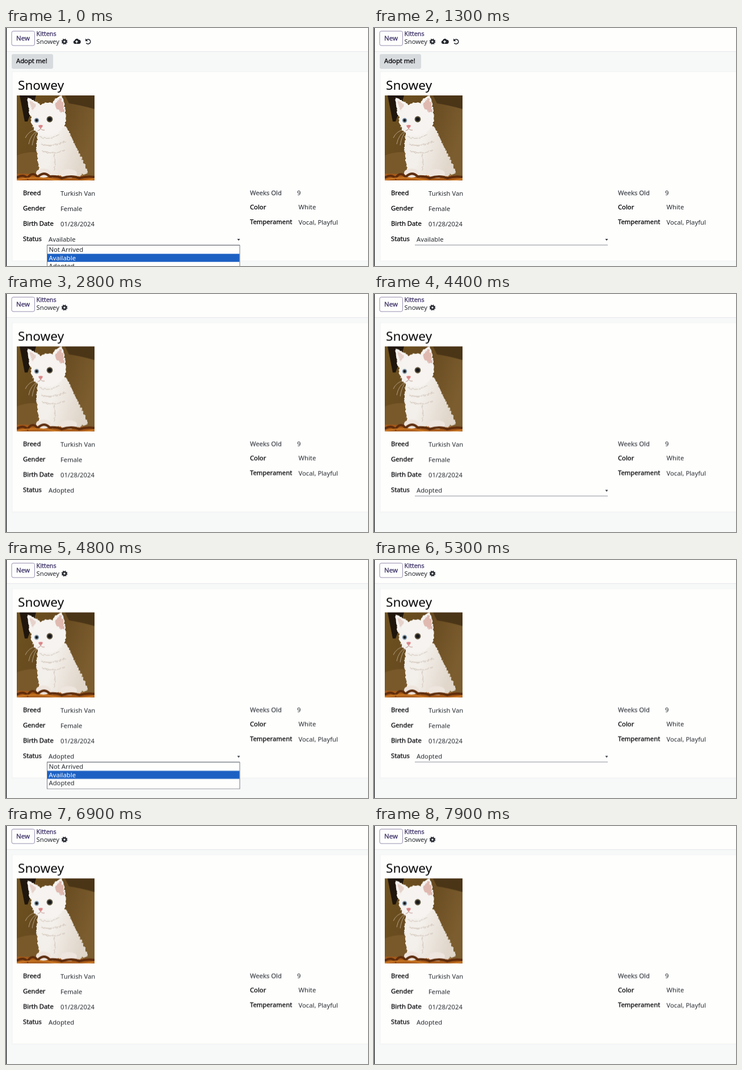
Animation, 638 px wide and 420 px high, one loop 8500 ms. Source, as an HTML page:

```html
<!DOCTYPE html>
<html lang="en">
<head>
<meta charset="utf-8">
<title>Kitten form</title>
<style>
html, body { margin: 0; width: 100%; height: 100%; overflow: hidden; background: #f7f8f8; }
svg { display: block; width: 638px; height: 420px; }
text { font: 11.25px "Noto Sans", "Open Sans", sans-serif; fill: #24282d; white-space: pre; }
.label text, .strong { font-weight: 500; fill: #08090b; stroke: #08090b; stroke-width: .3px; }
.label .muted { fill: #4b4f55; stroke: #4b4f55; }
.title { font-size: 22.6px; fill: #050505; }
.link { font-size: 10.8px; fill: #3d3267; stroke: #3d3267; }
.white { fill: #fff; }

/* Hard state changes on one shared clock */
.sheet, .draft, .saved, .focus, .popup, .pick-a, .pick-b, .button {
  animation: 8500ms step-end infinite;
}
.sheet { animation-name: sheet; }
.draft { animation-name: draft; }
.saved { animation-name: saved; }
.focus { animation-name: focus; }
.popup { animation-name: popup; }
.pick-a { animation-name: pick-a; }
.pick-b { animation-name: pick-b; }
.button { animation-name: button; }

@keyframes sheet {
  0%, 63.529% { transform: none; }
  28.235%, 78.823%, 100% { transform: translateY(-26.5px); }
}
@keyframes draft {
  0%, 63.529% { opacity: 1; }
  28.235%, 78.823%, 100% { opacity: 0; }
}
@keyframes saved {
  0%, 63.529% { opacity: 0; }
  28.235%, 78.823%, 100% { opacity: 1; }
}
@keyframes focus {
  0%, 37.647% { opacity: 1; }
  28.235%, 78.823%, 100% { opacity: 0; }
}
@keyframes popup {
  0%, 52.941% { opacity: 1; }
  8.235%, 61.176%, 100% { opacity: 0; }
}
@keyframes pick-a {
  0%, 56.47%, 100% { opacity: 1; }
  52.941% { opacity: 0; }
}
@keyframes pick-b {
  0%, 56.47%, 100% { opacity: 0; }
  52.941% { opacity: 1; }
}
@keyframes button {
  0% { fill: #d8dbde; }
  63.529%, 100% { fill: #cfd4d9; }
}
</style>
</head>
<body>
<svg viewBox="0 0 638 420">
  <defs>
    <linearGradient id="wall" x2="1" y2=".4">
      <stop offset="0" stop-color="#70531f"/>
      <stop offset=".5" stop-color="#66491f"/>
      <stop offset="1" stop-color="#7b5d2f"/>
    </linearGradient>
    <linearGradient id="fur" x2="1" y2=".3">
      <stop offset=".4" stop-color="#f3efea"/>
      <stop offset="1" stop-color="#e0d6ca"/>
    </linearGradient>
    <filter id="fluff" x="-10%" y="-10%" width="120%" height="120%">
      <feTurbulence type="fractalNoise" baseFrequency=".25" numOctaves="2" seed="4"/>
      <feDisplacementMap in="SourceGraphic" scale="5" xChannelSelector="R" yChannelSelector="G"/>
    </filter>
    <clipPath id="frame"><rect x="19" y="119" width="137" height="150"/></clipPath>
  </defs>

  <rect width="638" height="420" fill="#f7f8f8"/>
  <rect width="638" height="41" fill="#fefefd"/>
  <path d="M0 41.5H638" stroke="#e6e8ea"/>

  <!-- Header -->
  <rect x="10" y="5.5" width="40.5" height="25.5" rx="3" fill="#fefefd" stroke="#978eb0"/>
  <text class="strong link" x="18" y="22" style="font-size:11.5px">New</text>
  <text class="strong link" x="53.5" y="14">Kittens</text>
  <text x="53.5" y="28">Snowey</text>
  <g fill="none" stroke="#23272d">
    <circle cx="103" cy="24" r="2.9" stroke-width="2.4"/>
    <circle cx="103" cy="24" r="4.5" stroke-width="1.7" stroke-dasharray="1.77 1.77"/>
  </g>

  <g class="draft">
    <path d="M121.5 28a3 3 0 0 1-.5-5.9 3.8 3.8 0 0 1 7.1-1.3 3.6 3.6 0 0 1 .2 7.2Z" fill="#23272d"/>
    <path d="M124.5 27v-4.5m-2 2 2-2 2 2" fill="none" stroke="#fff" stroke-width="1.2"/>
    <path d="M141.5 21.5a4.1 4.1 0 1 1-.2 4.8" fill="none" stroke="#23272d" stroke-width="1.5"/>
    <path d="M140 18.6v4.6h4.6Z" fill="#23272d"/>
    <rect class="button" x="10" y="46" width="73" height="26" rx="3"/>
    <text class="strong" x="18" y="62.2">Adopt me!</text>
  </g>

  <!-- Form sheet -->
  <g class="sheet">
    <rect x="11" y="77" width="640" height="334" fill="#fefefd" stroke="#f0f1f2"/>
    <text class="title" x="21" y="109">Snowey</text>

    <g clip-path="url(#frame)">
      <rect x="19" y="119" width="137" height="150" fill="url(#wall)"/>
      <path d="M24 119h29l-9 30-6 16h-5Z" fill="#20160c"/>
      <path d="M104 119h52v24q-25-7-45-10Z" fill="#4b3517"/>
      <path d="M19 225q35-14 70 5v40H19Z" fill="#79592a"/>
      <path d="M19 257l137 4v10H19Z" fill="#a85a18"/>
      <g filter="url(#fluff)">
        <path d="M57 183C51 207 55 231 60 256l20 7 22-4 25 3 17-6C138 234 128 221 119 200L106 173Z" fill="url(#fur)"/>
        <path d="M38 123Q50 127 61 135 72 130 82 132 88 121 98 119 105 135 105 152 110 172 90 186 71 195 57 187 44 176 44 158 38 140 38 123Z" fill="#f6f3f0"/>
        <g fill="none" stroke="#d6ccc2" stroke-width="1.4">
          <path d="M59 191q15 9 34-3M61 204q16 8 44-4M62 217q24 8 42-2M85 222q3 16 0 30"/>
        </g>
        <path d="M86 137q4-10 11-14 6 13 5 25-8 3-16-11Z" fill="#dfb9b0"/>
        <path d="M41 128q8 3 13 9l-8 9Z" fill="#e6d2ca"/>
      </g>
      <g fill="#554b35">
        <circle cx="54" cy="163" r="4.2" fill="#7b93a8"/>
        <circle cx="77" cy="161" r="5.4"/>
      </g>
      <g fill="#171718">
        <circle cx="54" cy="163" r="2.4"/>
        <circle cx="77" cy="161" r="3.2"/>
      </g>
      <path d="M57 172q5-2 8 0-1 4-4 5-3-1-4-5Z" fill="#dc8588"/>
      <path d="M61 177q-1 4-5 4m5-4q2 4 7 3" fill="none" stroke="#b98d85"/>
      <path d="M55 178Q39 182 34 194M56 181Q43 188 40 205M56 182Q49 190 46 207" fill="none" stroke="#e2d9c9" stroke-width=".6"/>
      <g fill="#eee5de">
        <ellipse cx="66" cy="256" rx="13" ry="8"/>
        <ellipse cx="110" cy="257" rx="15" ry="8"/>
      </g>
      <path d="M19 264q11-7 19 1 8-13 18-2 10-11 21-1 14-1 21 3 18-6 31 0 13-4 27-2" fill="none" stroke="#5d2c0c" stroke-width="4"/>
      <path d="M19 268q35-7 67 0t70-2" fill="none" stroke="#d07c24" stroke-width="2"/>
    </g>

    <g class="label">
      <text x="30" y="295">Breed</text>
      <text x="30" y="322">Gender</text>
      <text x="30" y="349">Birth Date</text>
      <text x="30" y="376">Status</text>
      <text class="muted" x="430" y="295">Weeks Old</text>
      <text x="430" y="319.5">Color</text>
      <text x="430" y="346">Temperament</text>
    </g>
    <text x="96" y="296">Turkish Van</text>
    <text x="96" y="323">Female</text>
    <text x="96" y="350">01/28/2024</text>
    <text x="513" y="295">9</text>
    <text x="515.5" y="320">White</text>
    <text x="515.5" y="347">Vocal, Playful</text>

    <text class="draft" x="75" y="377">Available</text>
    <text class="saved" x="75" y="377">Adopted</text>
    <g class="focus">
      <path d="M72 383H412" stroke="#868a90"/>
      <path d="M407.5 372.3h5l-2.5 2.9Z" fill="#23272b"/>
    </g>

    <g class="popup">
      <rect x="72.5" y="383.5" width="339.5" height="47" fill="#fefefd" stroke="#777b80"/>
      <text x="75.5" y="395">Not Arrived</text>
      <text x="75.5" y="409.5">Available</text>
      <text x="75.5" y="424">Adopted</text>
      <g class="pick-a">
        <rect x="73" y="398.5" width="338.5" height="14.2" fill="#1c60c3"/>
        <text class="white" x="75.5" y="409.5">Available</text>
      </g>
      <g class="pick-b">
        <rect x="73" y="413" width="338.5" height="16" fill="#1c60c3"/>
        <text class="white" x="75.5" y="424">Adopted</text>
      </g>
    </g>
  </g>

  <rect width="1.2" height="420" fill="#17171a"/>
</svg>
</body>
</html>
```
